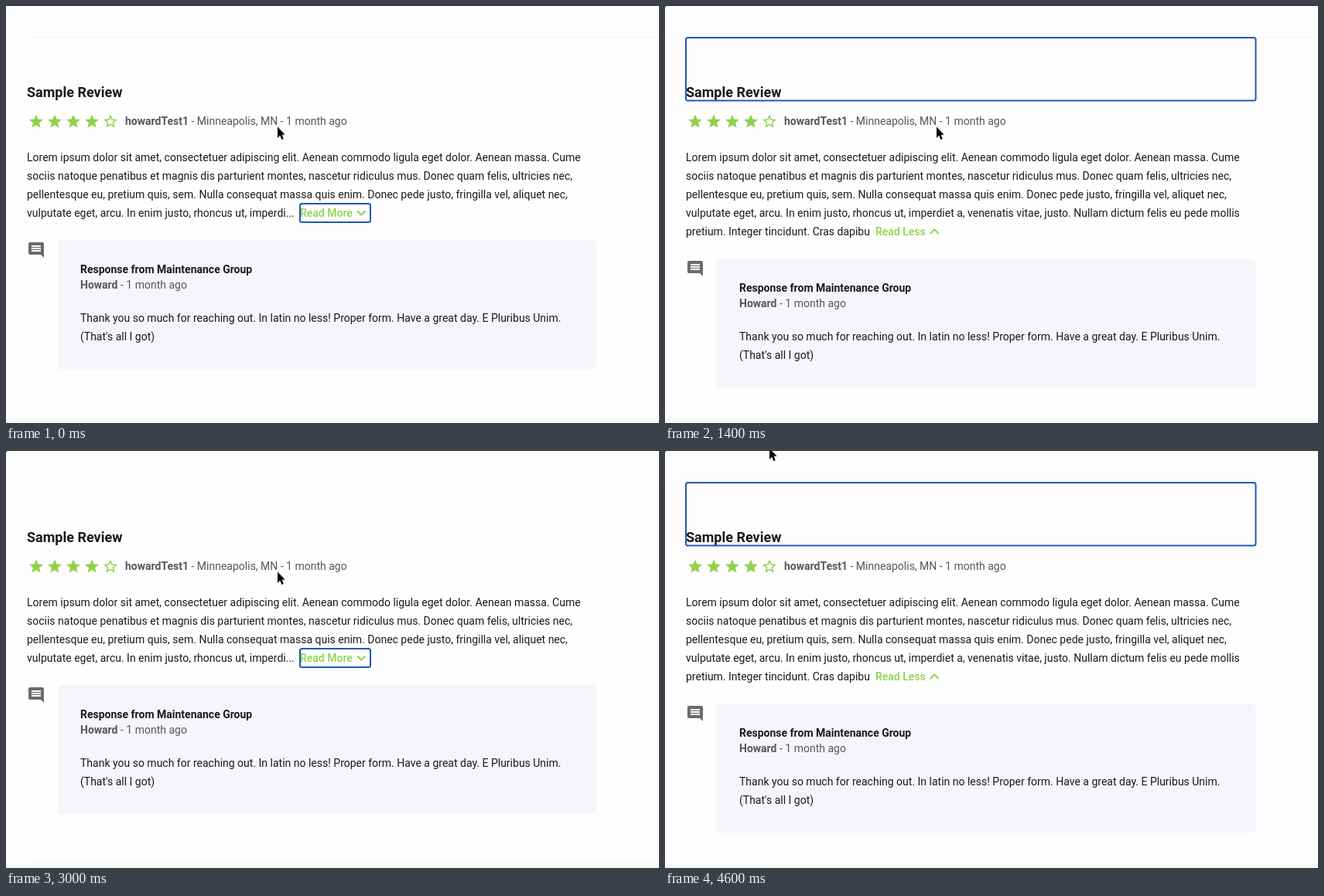
Recreate the animation shown at these times as an HTML page. Size 844x540 px, loop 4.8 s.

```html
<!DOCTYPE html>
<html lang="en">
<head>
<meta charset="utf-8">
<title>Review toggle</title>
<style>
  html, body { margin: 0; width: 100%; height: 100%; overflow: hidden; background: #fefefe; }
  svg { display: block; width: 844px; height: 540px; }
  text { font: 14px Roboto, sans-serif; fill: #1a1a1c; }
  b, .bold { font-weight: 700; }
  .title { font-size: 18px; font-weight: 700; }
  .meta { fill: #54575d; }
  .link text { font-weight: 500; fill: #8fd24d; }
  .green, .link path { fill: #8fd24d; }
  .ring { fill: none; stroke: #2158b8; stroke-width: 2; }
  .rule { fill: #f5f5f5; }

  .less, .more, .reply, .focus-title, .focus-less, .dot, .cursor {
    animation: 4800ms step-end infinite;
  }
  .more { animation-name: more; }
  .less { animation-name: less; }
  .reply { animation-name: push; }
  .focus-title { animation-name: focus-title; }
  .focus-less { animation-name: focus-less; }
  .dot { animation-name: dot; }
  .cursor { animation-name: leave; }

  @keyframes more { 0%, 62.5% { opacity: 1 } 16.666%, 83.333% { opacity: 0 } }
  @keyframes less { 0%, 62.5% { opacity: 0 } 16.666%, 83.333% { opacity: 1 } }
  @keyframes push {
    0%, 62.5% { transform: translateY(0) }
    16.666%, 83.333% { transform: translateY(24px) }
  }
  @keyframes focus-title { 0%, 37.5% { opacity: 0 } 16.666%, 83.333% { opacity: 1 } }
  @keyframes focus-less { 0%, 62.5% { opacity: 0 } 37.5% { opacity: 1 } }
  @keyframes dot { 0% { opacity: 0 } 12.5% { opacity: 1 } }
  @keyframes leave {
    0% { transform: translate(351px, 156.5px) }
    91.666% { transform: translate(336px, 146px) }
    95.833% { transform: translate(135px, -3.5px) }
  }
</style>
</head>
<body>
<svg viewBox="0 0 844 540">
  <defs>
    <path id="star" d="M12 17.27L18.18 21l-1.64-7.03L22 9.24l-7.19-.61L12 2 9.19 8.63 2 9.24l5.46 4.73L5.82 21z"/>
    <linearGradient id="shade" x2="0" y2="1">
      <stop offset="0" stop-color="#f4f4f4" stop-opacity="0"/>
      <stop offset="1" stop-color="#f4f4f4"/>
    </linearGradient>
  </defs>

  <rect class="rule" x="27" y="40" width="817" height="1"/>
  <text class="title" x="27" y="117.5">Sample Review</text>
  <rect class="ring focus-title" x="27" y="41" width="736.5" height="81.5" rx="2.5"/>

  <g class="green" transform="translate(28.2 138.7) scale(.9)">
    <use href="#star"/>
    <use href="#star" x="26.67"/>
    <use href="#star" x="53.33"/>
    <use href="#star" x="80"/>
    <path transform="translate(106.67)" d="M22 9.24l-7.19-.62L12 2 9.19 8.63 2 9.24l5.46 4.73L5.82 21 12 17.27 18.18 21l-1.63-7.03L22 9.24zM12 15.4l-3.76 2.27 1-4.28-3.32-2.88 4.38-.38L12 6.1l1.71 4.04 4.38.38-3.32 2.88 1 4.28L12 15.4z"/>
  </g>
  <text class="meta" x="154" y="154"><tspan class="bold">howardTest1</tspan> - Minneapolis, MN - 1 month ago</text>

  <text x="27" y="201">Lorem ipsum dolor sit amet, consectetuer adipiscing elit. Aenean commodo ligula eget dolor. Aenean massa. Cume</text>
  <text x="27" y="225">sociis natoque penatibus et magnis dis parturient montes, nascetur ridiculus mus. Donec quam felis, ultricies nec,</text>
  <text x="27" y="249">pellentesque eu, pretium quis, sem. Nulla consequat massa quis enim. Donec pede justo, fringilla vel, aliquet nec,</text>

  <g class="more">
    <text x="27" y="273">vulputate eget, arcu. In enim justo, rhoncus ut, imperdi...</text>
    <g class="link">
      <text x="380" y="273">Read More</text>
      <path transform="translate(447.2 256)" d="M16.59 8.59L12 13.17 7.41 8.59 6 10l6 6 6-6z"/>
    </g>
    <rect class="ring" x="380" y="256" width="91" height="24" rx="2.5"/>
  </g>

  <g class="less">
    <text x="27" y="273">vulputate eget, arcu. In enim justo, rhoncus ut, imperdiet a, venenatis vitae, justo. Nullam dictum felis eu pede mollis</text>
    <text x="27" y="297">pretium. Integer tincidunt. Cras dapibu</text>
    <g class="link">
      <text x="272" y="297">Read Less</text>
      <path transform="translate(336.2 280)" d="M12 8l-6 6 1.41 1.41L12 10.83l4.59 4.58L18 14z"/>
    </g>
    <rect class="ring focus-less" x="272" y="280" width="88.5" height="24" rx="2.5"/>
  </g>

  <g class="reply">
    <path fill="#6b6b6e" transform="translate(27 304)" d="M21.99 4c0-1.1-.89-2-1.99-2H4c-1.1 0-2 .9-2 2v12c0 1.1.9 2 2 2h14l4 4-.01-18zM18 14H6v-2h12v2zm0-3H6V9h12v2zm0-3H6V6h12v2z"/>
    <rect x="66" y="303" width="697.5" height="167.5" rx="6" fill="#f5f5fb"/>
    <text class="bold" x="96" y="346">Response from Maintenance Group</text>
    <text class="meta" x="96" y="366"><tspan class="bold">Howard</tspan> - 1 month ago</text>
    <text x="96" y="409">Thank you so much for reaching out. In latin no less! Proper form. Have a great day. E Pluribus Unim.</text>
    <text x="96" y="433">(That's all I got)</text>
    <rect class="rule" x="27" y="530.5" width="817" height="1"/>
  </g>

  <rect y="532" width="844" height="8" fill="url(#shade)"/>
  <rect class="dot" width="1" height="1"/>
  <path class="cursor" d="M0 0V14.2L3.2 11.2 5.4 16.4 7.8 15.4 5.6 10.3H9.8z" stroke="#fff" stroke-width="2" paint-order="stroke"/>
</svg>
</body>
</html>
```
